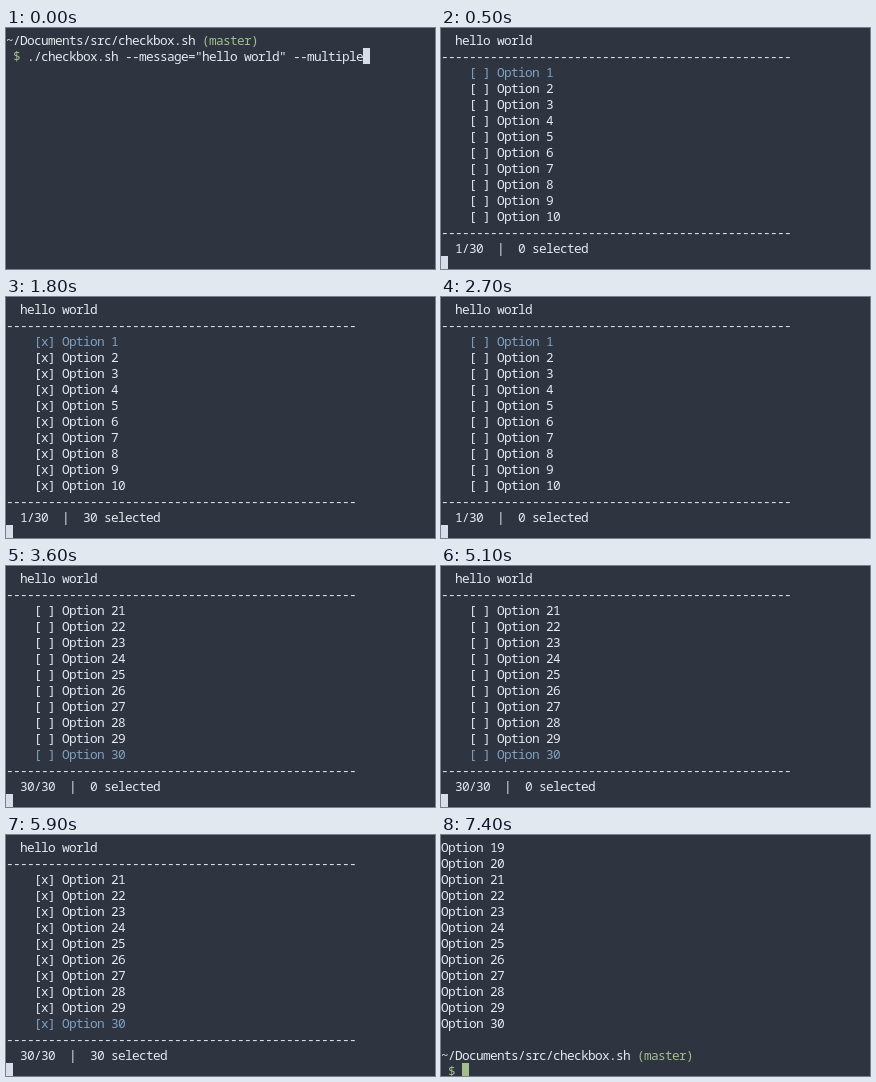
Animation of 429x241 px, one loop 8000 ms. Source, as an HTML page:

```html
<!DOCTYPE html>
<html lang="en">
<head>
<meta charset="utf-8">
<title>Terminal checkbox</title>
<style>
  html, body { margin: 0; width: 100%; height: 100%; overflow: hidden; background: #2e3440; }
  svg { display: block; }
  text { font: 12.8px "Noto Sans Mono", "DejaVu Sans Mono", monospace; white-space: pre; fill: #e5e9f0; }
  .active { fill: #81a1c1; }
  .green { fill: #a3be8c; }
  .cursor { fill: #d8dee9; }
</style>
</head>
<body>
<svg id="screen" width="429" height="241" viewBox="0 0 429 241"></svg>
<script>
const CELL = 7, LINE = 16, TOP = 4, BASE = 13;
const LOOP = 8000, TOTAL = 30, PAGE = 10;
const screen = document.getElementById("screen");

function add(tag, attrs, content = "") {
  const node = document.createElementNS("http://www.w3.org/2000/svg", tag);
  for (const key in attrs) node.setAttribute(key, attrs[key]);
  node.textContent = content;
  screen.append(node);
}

// Every character sits on the terminal's column grid.
function write(row, col, str, cls = "") {
  const x = Array.from(str, (_, i) => (col + i) * CELL).join(" ");
  add("text", { x, y: TOP + row * LINE + BASE, class: cls }, str);
}

function cursor(row, col, cls = "cursor") {
  add("rect", { x: col * CELL, y: TOP + row * LINE, width: CELL, height: LINE, class: cls });
}

function prompt(row) {
  write(row, 0, "~/Documents/src/checkbox.sh");
  write(row, 28, "(master)", "green");
  write(row + 1, 1, "$", "green");
}

function command() {
  const line = './checkbox.sh --message="hello world" --multiple';
  prompt(0);
  write(1, 3, line);
  cursor(1, 3 + line.length);
}

function menu(active, checked) {
  const first = active > PAGE ? active - PAGE + 1 : 1;
  const rule = "-".repeat(50);
  write(0, 2, "hello world");
  write(1, 0, rule);
  for (let i = 0; i < PAGE; i++) {
    const n = first + i;
    const cls = n === active ? "active" : "";
    write(2 + i, 4, checked ? "[x]" : "[ ]", cls);
    write(2 + i, 8, `Option ${n}`, cls);
  }
  write(12, 0, rule);
  write(13, 2, `${active}/${TOTAL}  |  ${checked ? TOTAL : 0} selected`);
  cursor(14, 0);
}

function result() {
  for (let i = 0; i < 12; i++) write(i, 0, `Option ${19 + i}`);
  prompt(13);
  cursor(14, 3, "green");
}

const scenes = [
  [0, command],
  [500, () => menu(1, false)],
  [1800, () => menu(1, true)],
  [2700, () => menu(1, false)],
  [3600, () => menu(TOTAL, false)],
  [4300, () => menu(TOTAL, true)],
  [5100, () => menu(TOTAL, false)],
  [5900, () => menu(TOTAL, true)],
  [7400, result]
];

let shown = null;
function tick() {
  const t = performance.now() % LOOP;
  const scene = scenes.findLast(([start]) => t >= start);
  if (scene !== shown) {
    shown = scene;
    screen.replaceChildren();
    scene[1]();
  }
  requestAnimationFrame(tick);
}
tick();
</script>
</body>
</html>
```
